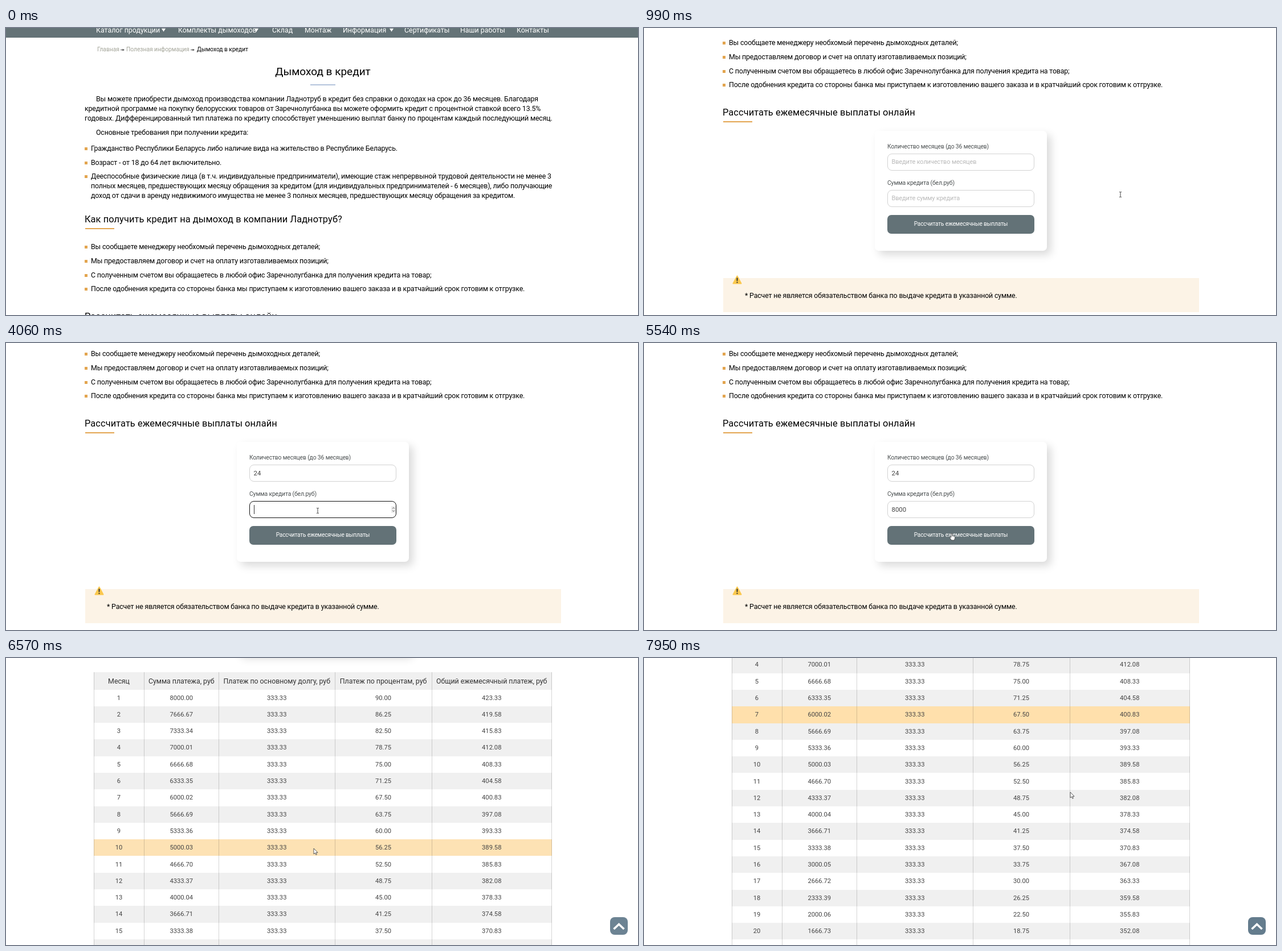
An HTML page that plays this animation: 1109 px wide and 505 px high, repeating every 8000 ms.

```html
<!DOCTYPE html>
<html lang="ru">
<head>
<meta charset="utf-8">
<title>Дымоход в кредит</title>
<style>
html, body { margin: 0; width: 100%; height: 100%; overflow: hidden; background: #fff; }
body { position: relative; font-family: Roboto, "Noto Sans", sans-serif; color: #000; }
#page, #page div, #page svg, #up, #cursor { position: absolute; }
#page { left: 0; top: 0; width: 1109px; height: 1600px; }
.t { white-space: pre; line-height: 20px; font-size: 12.4px; letter-spacing: -.16px; }
.mid { transform: translateX(-50%); }
.nav { color: #fff; font-size: 12.4px; letter-spacing: 0; }
.crumb { font-size: 10.3px; letter-spacing: -.05px; }
.old { color: #a3a498; }
.h1 { font-size: 19px; letter-spacing: 0; }
.h2 { font-size: 16.4px; letter-spacing: .08px; }
.label { font-size: 10.4px; letter-spacing: -.15px; color: #4a4f50; }
.field { font-size: 11.4px; letter-spacing: 0; color: #444; }
.hint { font-size: 11px; letter-spacing: -.15px; color: #b9b9b9; }
.btn { font-size: 10.2px; letter-spacing: -.2px; color: #fff; }
.th { font-size: 12.4px; letter-spacing: -.05px; color: #333; }
.td { font-size: 11.2px; letter-spacing: 0; color: #444; }
#card { left: 405px; top: 540px; width: 302px; height: 211px; border-radius: 7px; background: #fff; box-shadow: 7px 7px 15px rgba(0,0,0,.15); }
.input { box-sizing: border-box; left: 427px; width: 258px; height: 30px; border: 1px solid #d2d2d2; border-radius: 8px; background: #fff; }
.input.on { border: 1.6px solid #111; }
.caret { width: 1px; height: 16px; background: #333; }
.spin { left: 676px; width: 8px; height: 12px; background: #ececec; }
</style>
</head>
<body>
<div id="page"></div>
<svg id="up" style="left:1060px;top:456px" width="32" height="32">
  <rect width="31" height="31" rx="8" fill="#647c8d"/>
  <path d="M6.5 21 15.5 12.5 24.5 21" fill="none" stroke="#fff" stroke-width="3.6"/>
</svg>
<svg id="cursor" style="left:0;top:0;overflow:visible" width="1" height="1">
  <path id="beam" d="M-2-4.5H-.6L0-4 .6-4.5H2M0-4V4M-2 4.5H-.6L0 4 .6 4.5H2" fill="none" stroke="#444"/>
  <path id="arrow" d="M0 0V10L2.3 8 3.9 11.4 5.4 10.7 3.9 7.4H7Z" fill="#fff" stroke="#333" stroke-width=".8"/>
  <path id="hand" d="M-1 7V.8Q0-.8 1 .8V4.5Q3 4 5 5.5 6 6 5.6 8.5L4.4 12H-.4L-3.2 8Q-3.4 6.2-2 6.4Z" fill="#fff" stroke="#333" stroke-width=".7"/>
</svg>
<script>
const LOOP = 8000, TABLE_TOP = 783, ROW = 29.3, HEAD = 30.5, TABLE_VIEW = 758;
const $ = id => document.getElementById(id);
const page = $('page');

function add(parent, cls, css, text = '') {
  const el = document.createElement('div');
  el.className = cls;
  el.style.cssText = css;
  el.textContent = text;
  return parent.appendChild(el);
}
const text = (cls, x, y, s, parent = page) => add(parent, 't ' + cls, `left:${x}px;top:${y - 10}px`, s);
const box = (x, y, w, h, color, parent = page) =>
  add(parent, '', `left:${x}px;top:${y}px;width:${w}px;height:${h}px;background:${color}`);
function icon(x, y, w, h, body, parent = page) {
  parent.insertAdjacentHTML('beforeend',
    `<svg style="left:${x}px;top:${y}px" width="${w}" height="${h}">${body}</svg>`);
}

// Header
box(0, 0, 1109, 17, '#647377');
[[158, 'Каталог продукции'], [302, 'Комплекты дымоходов'], [467, 'Склад'], [524, 'Монтаж'],
 [591, 'Информация'], [699, 'Сертификаты'], [797, 'Наши работы'], [896, 'Контакты']]
  .forEach(([x, s]) => text('nav', x, 4, s));
[273, 436, 673].forEach(x => icon(x, 1, 7, 6, '<path d="M0 0H7L3.5 5.5Z" fill="#fff"/>'));
text('crumb old', 160, 38, 'Главная');
text('crumb old', 211, 38, 'Полезная информация');
text('crumb', 335, 38, 'Дымоход в кредит');
[201, 324].forEach(x => icon(x, 35, 7, 7, '<path d="M0 3.5H4" stroke="#555"/><path d="M3.5 1.5 7 3.5 3.5 5.5Z" fill="#555"/>'));
text('h1 mid', 556, 77, 'Дымоход в кредит');
box(534, 99, 44, 2, '#b4c4dc');

// Article
[[158, 125, 'Вы можете приобрести дымоход производства компании Ладнотруб в кредит без справки о доходах на срок до 36 месяцев. Благодаря'],
 [138, 142, 'кредитной программе на покупку белорусских товаров от Заречнолугбанка вы можете оформить кредит с процентной ставкой всего 13.5%'],
 [138, 159, 'годовых. Дифференцированный тип платежа по кредиту способствует уменьшению выплат банку по процентам каждый последующий месяц.'],
 [158, 184, 'Основные требования при получении кредита:'],
 [149, 212, 'Гражданство Республики Беларусь либо наличие вида на жительство в Республике Беларусь.'],
 [149, 236.5, 'Возраст - от 18 до 64 лет включительно.'],
 [149, 261, 'Дееспособные физические лица (в т.ч. индивидуальные предприниматели), имеющие стаж непрервыной трудовой деятельности не менее 3'],
 [149, 278, 'полных месяцев, предшествующих месяцу обращения за кредитом (для индивидуальных предпринимателей - 6 месяцев), либо получающие'],
 [149, 295, 'доход от сдачи в аренду недвижимого имущества не менее 3 полных месяцев, предшествующих месяцу обращения за кредитом.'],
 [149, 385, 'Вы сообщаете менеджеру необхомый перечень дымоходных деталей;'],
 [149, 410, 'Мы предоставляем договор и счет на оплату изготавливаемых позиций;'],
 [149, 434.5, 'С полученным счетом вы обращаетесь в любой офис Заречнолугбанка для получения кредита на товар;'],
 [149, 459, 'После одобнения кредита со стороны банка мы приступаем к изготовлению вашего заказа и в кратчайший срок готовим к отгрузке.']]
  .forEach(line => text('', ...line));
[212, 237, 261, 385, 410, 435, 459].forEach(y => box(138, y - 2, 5, 5, '#e3a550'));
[[337, 'Как получить кредит на дымоход в компании Ладнотруб?'], [508, 'Рассчитать ежемесячные выплаты онлайн']]
  .forEach(([y, s]) => { text('h2', 138, y, s); box(139, y + 15, 51, 2, '#e3a550'); });

// Form
add(page, '', '').id = 'card';
function field(y, label, hint) {
  text('label', 427, y - 27, label);
  const frame = add(page, 'input', `top:${y - 15}px`);
  const value = text('field', 434.5, y, '');
  const caret = add(page, 'caret', `top:${y - 8}px`);
  const spin = add(page, 'spin', `top:${y - 6}px`);
  icon(0, 0, 8, 12, '<path d="M2 4.5 4 2.5 6 4.5M2 7.5 4 9.5 6 7.5" fill="none" stroke="#555"/>', spin);
  return { frame, value, caret, spin, hint: text('hint', 434.5, y, hint) };
}
const months = field(595, 'Количество месяцев (до 36 месяцев)', 'Введите количество месяцев');
const amount = field(658.5, 'Сумма кредита (бел.руб)', 'Введите сумму кредита');
box(427, 687.5, 258, 33, '#637277').style.borderRadius = '7px';
text('btn mid', 556, 704, 'Рассчитать ежемесячные выплаты');

const note = box(138.5, 799, 835, 60, '#fcf3e6');
icon(16, -5, 18, 17, '<path d="M8.5 1.5 15.5 14.5H1.5Z" fill="#fbc84e" stroke="#fbc84e" stroke-width="2" stroke-linejoin="round"/><path d="M8.5 4.5V10M8.5 11.5V13.5" stroke="#333" stroke-width="2"/>', note);
text('', 38.5, 31, '* Расчет не является обязательством банка по выдаче кредита в указанной сумме.', note);

// Payment table
const edges = [154, 242, 373.5, 577, 747, 957.5];
const center = i => (edges[i] + edges[i + 1]) / 2;
const table = box(0, TABLE_TOP, 0, 0, 'none');
box(154, 0, 804, HEAD, '#f0f0f0', table);
['Месяц', 'Сумма платежа, руб', 'Платеж по основному долгу, руб', 'Платеж по процентам, руб', 'Общий ежемесячный платеж, руб']
  .forEach((s, i) => text('th mid', center(i), 15.5, s, table));
const glows = [];
for (let r = 0; r < 24; r++) {
  const y = HEAD + r * ROW;
  if (r % 2) box(154, y, 804, ROW, '#f0f0f0', table);
  glows.push(box(154, y, 804, ROW, '#ffe0ac', table));
  const interest = 90 - 3.75 * r;
  [r + 1, (8000 - 333.33 * r).toFixed(2), '333.33', interest.toFixed(2), (333.33 + interest).toFixed(2)]
    .forEach((s, i) => text('td mid', center(i), y + 15, s, table));
}
edges.forEach(x => box(Math.floor(x), 0, 1, HEAD + 24 * ROW, 'rgba(0,0,0,.16)', table));

// Number of steps taken at time t in a run of n steps
const taken = (t, from, to, n) =>
  t < from ? 0 : Math.min(n, Math.floor((t - from) / ((to - from) / (n - 1)) + 1.05));

const scrolls = [
  [530, 1330, 11, 0, 366, [0, .13, .34, .585, .78, .91, .98, 1]],
  [6090, 6710, 10, 366, TABLE_VIEW, [0, .02, .1, .3, .58, .83, .97, 1]],
  [7740, 7950, 4, TABLE_VIEW, TABLE_VIEW + 146, [0, .2, .55, .87, 1]]
];
function scrollAt(t) {
  let y = 0;
  for (const [from, to, n, a, b, ease] of scrolls)
    if (t >= from) y = a + (b - a) * ease[Math.min(taken(t, from, to, n), ease.length - 1)];
  return Math.round(y);
}

const moves = [
  [140, 370, 4, 836, 293], [1010, 1330, 5, 640, 293], [1460, 1590, 3, 573, 227],
  [2650, 2860, 4, 547, 295], [4800, 5000, 4, 540, 335], [6920, 7540, 10, 748, 236]
];
function pointer(t) {
  let x = 1123, y = 510;
  for (const [from, to, n, tx, ty] of moves) {
    const p = taken(t, from, to, n) / n;
    x += (tx - x) * p;
    y += (ty - y) * p;
  }
  return { x, y };
}

const hoverRow = t => t < 6470 ? -1 :
  Math.floor((pointer(t).y + TABLE_VIEW - TABLE_TOP - HEAD) / ROW);
const during = (t, spans) => spans.some(([a, b]) => t >= a && t < b);
const typed = (t, keys) => keys.reduce((s, [at, v]) => t >= at ? v : s, '');

function setField(f, value, focus, caret, spin) {
  f.frame.classList.toggle('on', focus);
  f.value.textContent = value;
  f.hint.hidden = focus || !!value;
  f.caret.hidden = !caret;
  f.caret.style.left = 434.5 + f.value.offsetWidth + 'px';
  f.spin.hidden = !spin;
}

function draw(now) {
  const t = now % LOOP;
  page.style.transform = `translateY(${-scrollAt(t)}px)`;

  const focus1 = during(t, [[1590, 3000]]), focus2 = during(t, [[3000, 5470]]);
  setField(months, typed(t, [[2380, '2'], [2450, '24']]), focus1,
    during(t, [[1590, 2050], [2380, 3000]]), during(t, [[1520, 3000]]));
  setField(amount, typed(t, [[4190, '8'], [4390, '80'], [4590, '800'], [4730, '8000']]), focus2,
    during(t, [[3000, 3530], [4060, 5270]]), during(t, [[1250, 1460], [2790, 5470]]));

  const result = t >= 6090;
  table.hidden = !result;
  note.hidden = result;
  $('up').style.opacity = Math.max(0, Math.min(1, (t - 6250) / 340));

  const trail = [0, 1, 2, 3, 4, 5, 6, 7].map(i => hoverRow(t - i * 15));
  glows.forEach((g, r) => g.style.opacity = trail.filter(h => h === r).length / 8);

  const { x, y } = pointer(t);
  const kind = t < 140 ? '' : result || x > 950 ? 'arrow' : y > 321 ? 'hand' : 'beam';
  for (const id of ['beam', 'arrow', 'hand']) $(id).style.display = id === kind ? '' : 'none';
  $('cursor').style.transform = `translate(${x}px,${y}px)`;
  requestAnimationFrame(draw);
}
requestAnimationFrame(draw);
</script>
</body>
</html>
```
